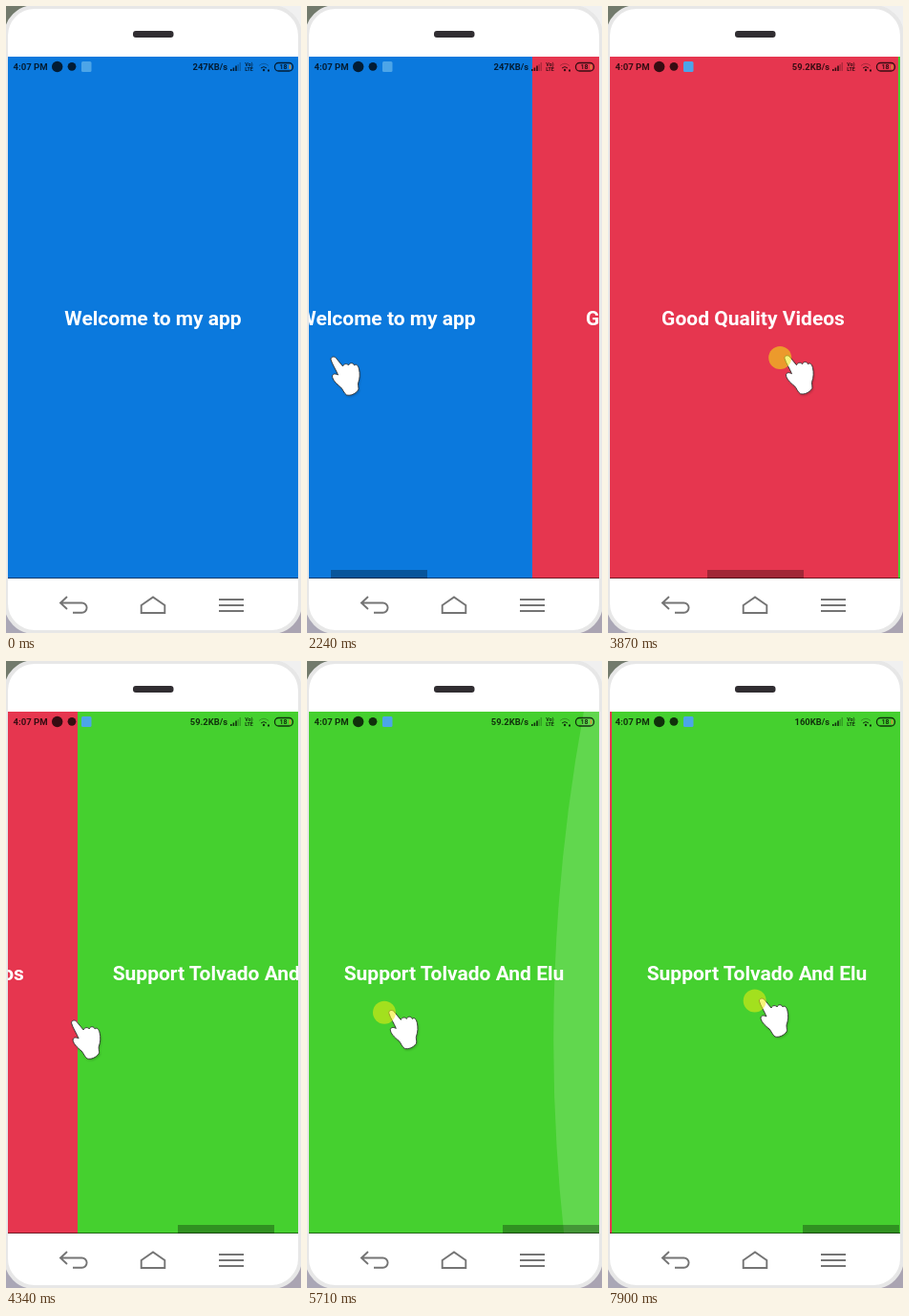
Recreate the animation shown at these times as an HTML page. Size 309 by 656 pixels, loop 8000 ms.

```html
<!DOCTYPE html>
<html lang="en">
<head>
<meta charset="utf-8">
<title>Swipe intro</title>
<style>
  html, body { margin: 0; width: 100%; height: 100%; overflow: hidden; background: #fff; }
  svg { display: block; width: 100%; height: 100%; }
  text { font-family: Roboto, sans-serif; }
  .title { font-size: 21px; font-weight: 700; fill: #fff; text-anchor: middle; }
  .status { fill: #000; opacity: .76; font-weight: 600; }
</style>
</head>
<body>
<svg viewBox="0 0 309 656">
  <defs>
    <clipPath id="screen"><rect x="2" y="53" width="304" height="546"/></clipPath>
    <filter id="soft" x="-30%" y="-30%" width="170%" height="170%"><feGaussianBlur stdDeviation="1"/></filter>
    <path id="handShape" d="M.5 3C0 0 4-1 6 1.5L13 10C14 7 18 7 19 9C20 6 24 6 25 9C27 7 29 9 30 13C31 18 31 22 29 28C29 32 30 33 29 35C26 39 21 41 17 40C14 38 13 34 11 32C6 28 2 24 2 20C3 17 6 18 8 19C6 14 2 8 .5 3Z"/>
  </defs>

  <!-- backdrop corners and phone body -->
  <rect width="309" height="656" fill="#f0f0f0"/>
  <rect width="30" height="30" fill="#727a6c"/>
  <rect y="620" width="40" height="36" fill="#aaa7b6"/>
  <rect x="270" y="620" width="39" height="36" fill="#aaa4b2"/>
  <rect y="1" width="308" height="654" rx="30" fill="#fff" stroke="#e7e7e7" stroke-width="4"/>
  <rect x="133" y="26" width="42.500" height="7" rx="3" fill="#302d31"/>

  <g clip-path="url(#screen)">
    <g id="pages"></g>
    <path id="glow" fill="#fff" opacity=".15"/>
    <rect id="bar" y="590" width="101" height="9"/>
    <rect x="2" y="598" width="304" height="1" opacity=".5"/>
  </g>

  <g class="status">
    <text x="7.500" y="67.300" font-size="9.600">4:07 PM</text>
    <circle cx="53.700" cy="63.500" r="5.700"/>
    <circle cx="69" cy="63.300" r="4.400"/>
    <text id="speed" x="232" y="67.300" font-size="9.400" text-anchor="end"></text>
    <path d="M235 68v-2h1.600v2zM237.600 68v-3.500h1.600v3.500zM240.200 68v-5.500h1.600v5.500z"/>
    <path d="M242.500 68v-7h1.300v7zM244.600 68v-9h1.300v9z" opacity=".35"/>
    <text x="254.500" y="63.200" font-size="5.400" text-anchor="middle">Vo)</text>
    <text x="254.500" y="68.300" font-size="5.400" text-anchor="middle">LTE</text>
    <g fill="none" stroke="#000">
      <path d="M265 62.500q5-4.500 10 0" opacity=".35"/>
      <path d="M267 65q3-2.800 6 0"/>
      <rect x="281.500" y="59.500" width="19" height="8.500" rx="4" stroke-width="1.300"/>
    </g>
    <circle cx="270" cy="67" r="1.200"/>
    <path d="M274 66.500h2v2h-2z"/>
    <text x="290.500" y="66.400" font-size="7" text-anchor="middle">18</text>
  </g>
  <path d="M297.500 61.500v4.500" stroke="#d9933a" stroke-width="1.500"/>
  <rect x="79" y="58" width="10.500" height="11" rx="1.500" fill="#4ca5e8"/>

  <g fill="none" stroke="#747474" stroke-width="1.900">
    <path d="M64 618L57 624.500L64 631M57 624.500H79.500a5.100 5.100 0 0 1 0 10.200H70"/>
    <path d="M141.700 627L154 618.500L166.300 627V635H141.700Z"/>
    <path d="M223 621H249M223 627H249M223 633H249"/>
  </g>

  <g id="hand">
    <use href="#handShape" x="1" y="1.500" opacity=".2" filter="url(#soft)"/>
    <use href="#handShape" fill="#fff" stroke="#333" stroke-width=".9"/>
    <circle id="touch" cx="-4.300" cy="2.400" r="12" fill="#f0ec10" opacity=".55"/>
  </g>
</svg>
<script>
const LOOP = 8000, LEFT = 2, TOP = 53, RIGHT = 306, BOTTOM = 599, WIDTH = RIGHT - LEFT;
const APPEAR = 280, PRESS_HOLD = 80, LIFT_HOLD = 100, RETURN = 800;
const GLOW_FADE = 500, BAR_DELAY = 300, BAR_FADE = 250;
const $ = id => document.getElementById(id);

const pages = [
  ['#0b79dd', 'Welcome to my app'],
  ['#e6364f', 'Good Quality Videos'],
  ['#45d02f', 'Support Tolvado And Elu']
];
$('pages').innerHTML = pages.map(([color, title], i) => `
  <g transform="translate(${LEFT + i * WIDTH} 0)">
    <rect y="${TOP}" width="${WIDTH + 1}" height="${BOTTOM - TOP}" fill="${color}"/>
    <text class="title" x="${WIDTH / 2}" y="334">${title}</text>
  </g>`).join('');

// A swipe either turns to a page (settle = time span) or pulls the overscroll glow
const swipes = [
  { press: 1850, release: 2220, to: [24, 367], back: [283, 357], page: 1, settle: [2033, 2700] },
  { press: 3470, release: 4330, to: [68, 376], back: [269, 357], page: 2, settle: [3836, 4576] },
  { press: 5470, release: 5840, to: [73, 366], back: [268, 357], pull: 51 },
  { press: 6640, release: 6960, to: [93, 354], back: [93, 354], pull: 26 },
  { press: 7745, release: LOOP, to: [158, 353], back: [158, 353], page: 1, settle: [7850, 8900] }
];
for (const s of swipes) s.drag = [s.press + PRESS_HOLD, s.release - LIFT_HOLD];

const clamp = u => Math.max(0, Math.min(1, u));
const mix = (a, b, u) => a + (b - a) * u;
function ease(t, [start, end]) {
  const u = clamp((t - start) / (end - start));
  return u * u * (3 - 2 * u);
}

function handAt(t) {
  let pos = [298, 594];
  const move = (to, span) => { pos = pos.map((v, i) => mix(v, to[i], ease(t, span))); };
  move([291, 427], [APPEAR, 510]);
  move([291, 359], [600, 1140]);
  for (const s of swipes) {
    move(s.to, s.drag);
    move(s.back, [s.release, s.release + RETURN]);
  }
  return pos;
}

const scrollAt = t => Math.round(swipes.filter(s => s.settle)
  .reduce((x, s) => mix(x, s.page * WIDTH, ease(t, s.settle)), 0));

const glowAt = t => Math.max(...swipes.filter(s => s.pull)
  .map(s => s.pull * ease(t, s.drag) * clamp(1 - (t - s.drag[1]) / GLOW_FADE)));

const barAt = t => Math.max(...swipes.map(s => {
  const idle = t - (s.settle || s.drag)[1] - BAR_DELAY;
  return t < s.drag[0] ? 0 : clamp(1 - idle / BAR_FADE);
}));

// Parabolic overscroll edge
function glowPath(depth) {
  const c = 397, k = 5.6e-6, half = (BOTTOM - TOP) / 2;
  const edge = y => RIGHT - depth * (1 - k * (y - c) ** 2);
  const ctrl = edge(TOP) + 2 * depth * k * (TOP - c) * half;
  return `M${RIGHT} ${TOP}H${edge(TOP)}Q${ctrl} ${TOP + half} ${edge(BOTTOM)} ${BOTTOM}H${RIGHT}Z`;
}

function render(t) {
  const scroll = scrollAt(t);
  $('pages').setAttribute('transform', `translate(${-scroll} 0)`);
  $('bar').setAttribute('x', Math.round(LEFT + scroll / 3));
  $('bar').setAttribute('opacity', .3 * barAt(t));
  $('glow').setAttribute('d', glowPath(glowAt(t)));
  $('speed').textContent = ['247KB/s', '59.2KB/s', '160KB/s'][Math.floor((t + 850) / 4000)];
  $('hand').setAttribute('transform', `translate(${handAt(t)})`);
  $('hand').style.display = t < APPEAR ? 'none' : '';
  $('touch').style.display = swipes.some(s => t >= s.press && t < s.release) ? '' : 'none';
}

const begin = performance.now();
function tick() {
  render((performance.now() - begin) % LOOP);
  requestAnimationFrame(tick);
}
tick();
</script>
</body>
</html>
```
